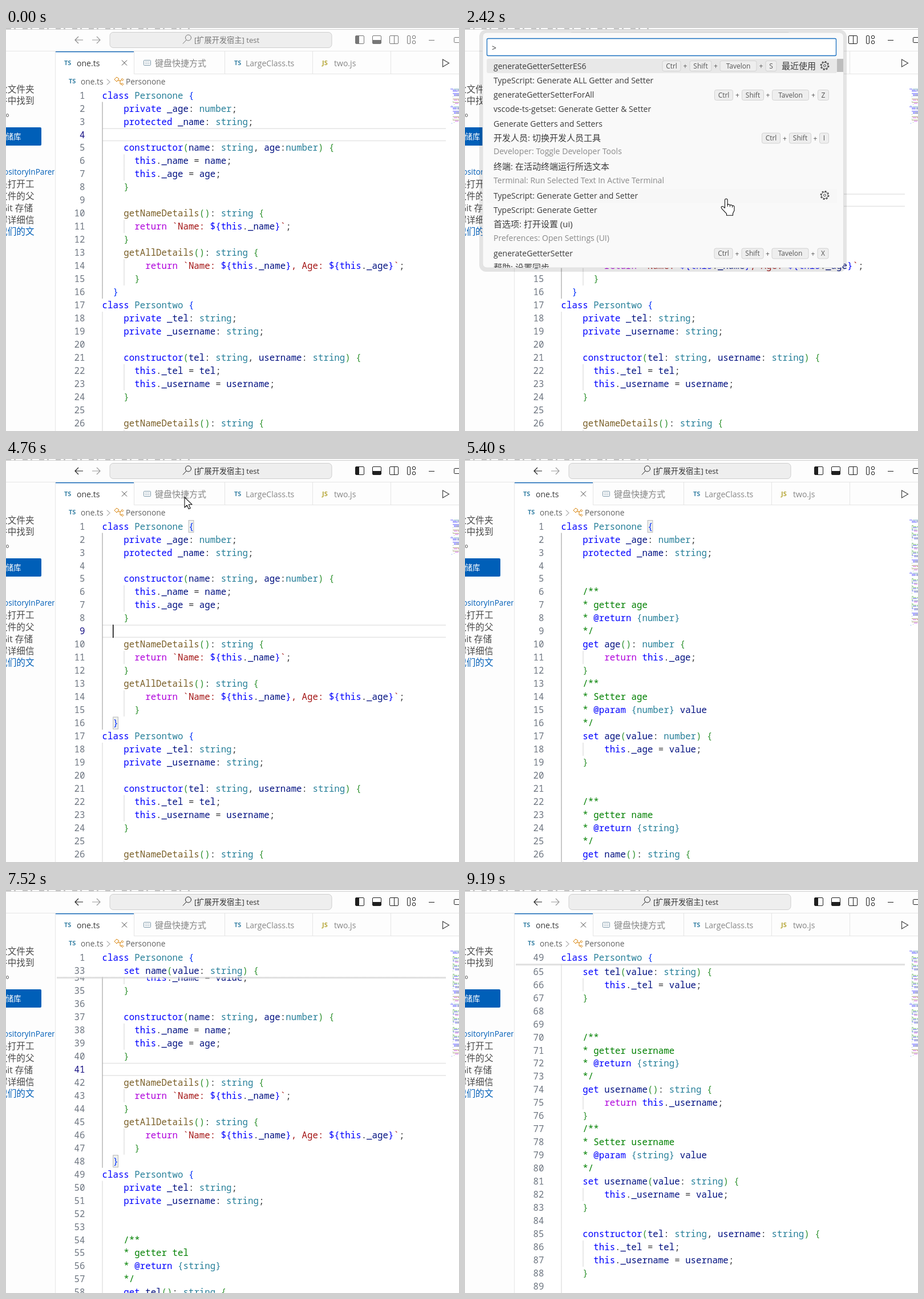
Animation of 794x706 px, one loop 9.81 s. Source, as an HTML page:

```html
<!DOCTYPE html>
<html lang="zh">
<head>
<meta charset="utf-8">
<title>Generate getters and setters</title>
<style>
html, body { margin: 0; width: 100%; height: 100%; overflow: hidden; background: #fff; }
svg { display: block; width: 794px; height: 706px; }
text { font-family: "Open Sans", "Noto Sans CJK SC", "Noto Sans CJK", sans-serif; white-space: pre; }
.code { font: 15.77px "Noto Sans Mono", "DejaVu Sans Mono", monospace; font-variant-ligatures: none; }
</style>
</head>
<body>
<svg id="stage" viewBox="0 0 794 706">
  <defs>
    <clipPath id="editorClip"><rect x="87" y="106" width="685" height="600"/></clipPath>
    <clipPath id="mapClip"><rect x="776" y="104" width="18" height="300"/></clipPath>
    <clipPath id="sideClip"><rect width="85" height="706"/></clipPath>
    <clipPath id="listClip"><rect x="31" y="50" width="632" height="370"/></clipPath>
    <linearGradient id="shade" x2="0" y2="1">
      <stop offset="0" stop-color="#cfcfcf"/><stop offset="1" stop-color="#cfcfcf" stop-opacity="0"/>
    </linearGradient>
  </defs>
  <g id="scene"></g>
</svg>
<script>
const LOOP = 9810, LINE = 22.97, CHAR = 9.46, LEFT = 168.5, TOP = 118, NOTCH = 144.5;
const WHEEL = [6020, 6420, 7160, 7400, 7480, 7760, 7880, 8250, 8700, 9070];
const OPEN = 1850, PASTE = 2870, RUN = 4760, INSERT = 4960;
const SUPER_KEY = 'Tavelon';
const scene = document.getElementById('scene');

const esc = s => s.replace(/&/g, '&amp;').replace(/</g, '&lt;');
const rect = (x, y, w, h, fill, more = '') =>
  `<rect x="${x}" y="${y}" width="${w}" height="${h}" fill="${fill}" ${more}/>`;
const path = (d, stroke, more = 'fill="none"') => `<path d="${d}" stroke="${stroke}" ${more}/>`;
const label = (x, y, s, fill = '#3b3b3b', size = 14.05, more = '') =>
  `<text x="${x}" y="${y + size * 0.36}" font-size="${size}" fill="${fill}" ${more}>${esc(s)}</text>`;

// ---- source code shown in the editor ----
const accessors = ([name, type]) => ['', '',
  '/**', `* getter ${name}`, `* @return {${type}}`, '*/',
  `get ${name}(): ${type} {`, `    return this._${name};`, '}',
  '/**', `* Setter ${name}`, `* @param {${type}} value`, '*/',
  `set ${name}(value: ${type}) {`, `    this._${name} = value;`, '}'
].map(s => s && '    ' + s);

function classLines(name, fields, params, first, second, props) {
  const [a, b] = second;
  return [
    `class ${name} {`, ...fields.map(f => '    ' + f), ...props.flatMap(accessors), '',
    `    constructor(${params}) {`,
    ...first.map(p => `      this._${p} = ${p};`), '    }', '',
    '    getNameDetails(): string {', '      return `Name: ${this._' + a + '}`;', '    }',
    '    getAllDetails(): string {',
    '        return `Name: ${this._' + a + '}, Age: ${this._' + b + '}`;', '      }', '  }'
  ];
}

function makeDoc(full) {
  const lines = [
    ...classLines('Personone', ['private _age: number;', 'protected _name: string;'],
      'name: string, age:number', ['name', 'age'], ['name', 'age'],
      full ? [['age', 'number'], ['name', 'string']] : []),
    ...classLines('Persontwo', ['private _tel: string;', 'private _username: string;'],
      'tel: string, username: string', ['tel', 'username'], ['username', 'tel'],
      full ? [['tel', 'string'], ['username', 'string']] : [])
  ];
  const tokens = lines.map(tokenize);
  const scopes = [];
  lines.forEach((s, i) => {
    if (/^    \w.*\{$/.test(s)) scopes.push([i, lines.findIndex((q, j) => j > i && /^ +\}$/.test(q))]);
  });
  return { lines, tokens, scopes, classEnd: lines.indexOf('  }'), map: minimap(tokens) };
}

const RULES = [
  ['#0000ff', /^(class|private|protected|constructor|this|get|set)\b/],
  ['#af00db', /^return\b/],
  ['#267f99', /^(number|string|Personone|Persontwo)\b/],
  ['#795e26', /^get\w+Details/],
  ['#a31515', /^(`Name: |, Age: |`)/],
  ['#0000ff', /^(\$\{|\}(?=[`,]))/],
  ['bracket', /^[(){}]/],
  ['#001080', /^\w+/],
  ['#3b3b3b', /^( +|.)/]
];
const DOC_RULES = [
  ['#0000ff', /^@\w+/],
  ['#267f99', /^\{\w+\}/],
  ['#001080', /^value/],
  ['#008000', /^( +|[^ ]+)/]
];

function tokenize(line) {
  const rules = /^ *[/*]/.test(line) ? DOC_RULES : RULES;
  const bracket = /^class|^  \}$/.test(line) ? '#0431fa' : '#319331';
  const out = [];
  for (let col = 0; col < line.length;) {
    const rest = line.slice(col);
    const [color, re] = rules.find(r => r[1].test(rest));
    const text = rest.match(re)[0];
    out.push({ col, text, color: color === 'bracket' ? bracket : color });
    col += text.length;
  }
  return out;
}

function minimap(tokens) {
  const marks = tokens.map((row, i) => row.filter(k => k.text.trim() && k.col < 15)
    .map(k => rect(779 + k.col, 106.4 + i * 1.94, k.text.length, 1.1, k.color)).join(''));
  return `<g clip-path="url(#mapClip)" opacity=".55">${marks.join('')}</g>`;
}

const before = makeDoc(false), after = makeDoc(true);

function codeText(doc, i, y, active) {
  const spans = doc.tokens[i].map(k => `<tspan fill="${k.color}">${esc(k.text)}</tspan>`).join('');
  return `<text class="code" x="138.5" y="${y + 5.6}" text-anchor="end" fill="${active ? '#171184' : '#6e7681'}">${i + 1}</text>` +
    `<text class="code" x="${LEFT}" y="${y + 5.6}" xml:space="preserve">${spans}</text>`;
}

function editor(doc, scroll, cursorLine, boxes, caret) {
  const yOf = i => TOP + i * LINE - scroll;
  const half = LINE / 2;
  let s = '';
  const cy = yOf(cursorLine);
  s += rect(169, cy - 11.5, 602, 1.6, '#e6e6e6') + rect(169, cy + 9.8, 602, 1.6, '#e6e6e6');
  doc.lines.forEach((line, i) => {
    const y = yOf(i);
    if (y < 90 || y > 725) return;
    if (!line.startsWith('class'))
      s += rect(168.5, y - half, 1, LINE + 0.1, i <= doc.classEnd ? '#939393' : '#d3d3d3');
    if (/^ {5}/.test(line)) s += rect(206.5, y - half, 1, LINE + 0.1, '#d3d3d3');
    if (boxes && (i === 0 || i === doc.classEnd)) {
      const col = i ? 2 : 16;
      s += rect(LEFT + col * CHAR + 0.3, y - 10.5, CHAR - 0.7, 21, '#eef0ee', 'stroke="#b9b9b9"');
    }
    s += codeText(doc, i, y, i === cursorLine);
  });
  if (caret) s += rect(187, cy - 11.5, 1.5, 23, '#000');

  // Sticky headers of the scopes that have scrolled past the top
  if (scroll > 0) {
    const second = doc.classEnd + 1;
    const owner = yOf(second) < TOP ? second : 0;
    const method = owner === 0 && doc.scopes.find(([a, b]) => yOf(a) < 140 && yOf(b) > 141);
    const rows = method ? [owner, method[0]] : [owner];
    const h = rows.length * LINE;
    s += rect(88, 106, 684, h + 0.5, '#fff') + rect(89, 106.5 + h, 682, 4, 'url(#shade)');
    rows.forEach((i, n) => { s += codeText(doc, i, TOP + n * LINE); });
  }
  return `<g clip-path="url(#editorClip)">${s}</g>` + doc.map;
}

// ---- window frame ----
function sidebar() {
  const ink = '#4a4a4a', blue = '#005fb8';
  const row = (y, s, fill = ink, end = 49.5) => label(end, y, s, fill, 15.6, 'text-anchor="end"');
  return rect(0, 41, 86, 665, '#fdfdfd') + rect(86, 41, 1, 665, '#e5e5e5') +
    '<g clip-path="url(#sideClip)">' +
    row(107, '父文件夹') + row(127.5, '件中找到') + row(148, '库。', ink, 15) +
    rect(-10, 174, 72, 32, blue, 'rx="2"') + label(26.5, 190, '存储库', '#fff', 13.5, 'text-anchor="end"') +
    label(-4, 252, 'ositoryInParentFolders', blue, 13.6) +
    row(273, '是打开工') + row(294, '文件的父') + row(315, 'Git 存储', ink, 47) +
    row(336, '解详细信') + row(356, '我们的文', blue) + '</g>';
}

function titleBar(focused, canGoBack) {
  const ink = focused ? '#1f1f1f' : '#777';
  const arrow = 'fill="none" stroke-width="1.2"';
  const frame = (x, w = 15) => rect(x + 0.5, 13.5, w, 14, 'none', `stroke="${ink}" rx="1.5"`);
  return rect(0, 0, 794, 41, '#fdfdfd') + rect(0, 2, 794, 1, '#cfcfcf') + rect(0, 40, 794, 1, '#e5e5e5') +
    path('M0 1H322', '#8f8f8f', 'stroke-dasharray="9 5 3 12"') +
    path('M135 21H121.5M127 15l-6 6 6 6', canGoBack ? '#222' : '#8a8a8a', arrow) +
    path('M151 21h13.5M159 15l6 6-6 6', '#9a9a9a', arrow) +
    rect(182, 7.5, 389, 27, '#eeeeee', 'rx="6" stroke="#cfcfcf"') +
    `<circle cx="319.5" cy="17" r="5" fill="none" stroke="${ink}"/>` + path('M316 21l-6 6.5', ink) +
    label(330, 21, '[扩展开发宿主] test', focused ? '#333' : '#777', 13.2) +
    frame(612) + rect(613, 14, 6, 13, ink) +
    frame(642) + rect(643, 21, 14, 6, ink) +
    frame(672) + path('M680.5 14v13', ink) +
    rect(703.5, 13.5, 5, 14, 'none', `stroke="${ink}" rx="1.5"`) +
    rect(712.5, 13.5, 5, 5, 'none', `stroke="${ink}" rx="1.5"`) +
    rect(712.5, 22.5, 5, 5, 'none', `stroke="${ink}" rx="1.5"`) +
    path('M741 21.5h10', ink) + rect(785.5, 16.5, 10, 9, 'none', `stroke="${ink}" rx="1"`);
}

function tabs() {
  const gray = '#868686', ts = '#3f86a8';
  const badge = (x, y, s, fill) => label(x, y, s, fill, 11, 'font-weight="700"');
  let s = rect(87, 41, 707, 40, '#fdfdfd') + rect(224, 80, 570, 1, '#e5e5e5') +
    rect(87, 41, 137, 40, '#fff') + rect(87, 41, 137, 1.3, '#005fb8');
  for (const x of [224, 383, 537, 674]) s += rect(x, 41, 1, 40, '#e5e5e5');
  return s +
    badge(102, 61, 'TS', ts) + label(124, 62, 'one.ts') +
    path('M203 56.5l9 9m0-9l-9 9', '#444') +
    rect(241.5, 56.5, 12, 9, 'none', 'stroke="#7c97a8" rx="1"') +
    path('M244 59.5h8M244 62.5h8', '#7c97a8', 'stroke-dasharray="1.5 1"') +
    label(261, 61.5, '键盘快捷方式', gray, 15) +
    badge(400, 61, 'TS', ts) + label(420, 62, 'LargeClass.ts', gray) +
    badge(554, 61, 'JS', '#b7a83b') + label(575, 62, 'two.js', gray) +
    path('M765.5 55l11 6.5-11 6.5z', '#444', 'fill="none" stroke-width="1.2"') +
    badge(110, 93.5, 'TS', ts) + label(131, 94.5, 'one.ts', '#616161', 13.75) +
    path('M177 89.5l5 5-5 5', '#777') +
    path('M190 90l4-4 4 3-4 5zM196 92h4v6h2M200 92h2M202 90l2-1.5 2 2-2 2zM202 98l2-1.5 2 2-2 2z', '#d67e00') +
    label(210, 94.5, 'Personone', '#616161', 13.75);
}

// ---- command palette ----
function keys(x, last, superKey = true) {
  const key = (dx, w, s) => rect(x + dx, 57.5, w, 18, '#eeeeee', 'rx="3" stroke="#d2d2d2"') +
    label(x + dx + w / 2, 66.5, s, '#555', 12, 'text-anchor="middle"');
  const plus = dx => label(x + dx, 67, '+', '#555', 12, 'text-anchor="middle"');
  return key(0, 32, 'Ctrl') + plus(40) + key(48, 38, 'Shift') + plus(93.5) +
    (superKey ? key(101, 64, SUPER_KEY) + plus(173) + key(181, 19, last) : key(101, 16, last));
}

const gear = y => `<g fill="none" stroke="#444"><circle cx="630.5" cy="${y}" r="7" stroke-width="1.8" stroke-dasharray="2.9 2.6"/>` +
  `<circle cx="630.5" cy="${y}" r="5.6"/><circle cx="630.5" cy="${y}" r="2"/></g>`;
const atRow = (y, s) => `<g transform="translate(0 ${y - 66})">${s}</g>`;
const item = (y, s, fill, more) => label(50, y, s, fill, /[\u4e00-\u9fff]/.test(s) ? 15 : 14.05, more);

function fullList() {
  const soft = '#8a8a8a';
  return '<g clip-path="url(#listClip)">' + rect(38, 54, 614, 25, '#e8e8e8', 'rx="3"') +
    rect(38, 282, 614, 25, '#f7f7f7') + rect(652, 54, 12, 23, '#bdbdbd') +
    item(66.5, 'generateGetterSetterES6') + keys(346, 'S') + label(555, 66.5, '最近使用', '#3b3b3b', 15) + gear(66) +
    item(91.5, 'TypeScript: Generate ALL Getter and Setter') +
    item(117, 'generateGetterSetterForAll') + atRow(117, keys(437.5, 'Z')) +
    item(142, 'vscode-ts-getset: Generate Getter & Setter') +
    item(168, 'Generate Getters and Setters') +
    item(193, '开发人员: 切换开发人员工具') + atRow(192.5, keys(520.5, 'I', false)) +
    item(216, 'Developer: Toggle Developer Tools', soft) +
    item(243, '终端: 在活动终端运行所选文本') +
    item(267, 'Terminal: Run Selected Text In Active Terminal', soft) +
    item(294, 'TypeScript: Generate Getter and Setter') + gear(293) +
    item(319, 'TypeScript: Generate Getter') +
    item(344, '首选项: 打开设置 (ui)') + item(368, 'Preferences: Open Settings (UI)', soft) +
    item(395, 'generateGetterSetter') + atRow(394.5, keys(437, 'X')) +
    item(420, '帮助: 设置同步') + '</g>';
}

function shortList(hoverRow) {
  const shift = hoverRow === 1 ? 0 : 23;
  return rect(38, 54, 619, 25, '#e8e8e8', 'rx="3"') +
    (hoverRow > 0 ? rect(38, 54 + hoverRow * 25.5, 619, 25, '#f2f2f2', 'rx="3"') + gear(66.5 + hoverRow * 25.5) : '') +
    item(66.5, 'generateGetterSetterForAllES6', '#0060b8', 'font-weight="700"') + keys(408.5, 'D') + gear(66) +
    item(92, 'generateGetterSetterForAll') + atRow(92.5, keys(346 + shift, 'Z')) +
    label(555 + shift, 92.5, '类似命令', '#8a8a8a', 15) +
    item(117.5, 'TypeScript: Generate ALL Getter and Setter');
}

function palette(t, pointer) {
  const pasted = t >= PASTE, bottom = pasted ? 135 : 420;
  const hoverRow = pointer ? (pointer[1] >= 105 ? 2 : pointer[1] >= 80 ? 1 : 0) : 0;
  const caretOn = (t >= OPEN && t < 2420) || (t >= PASTE && t < 3410) || (t >= 3940 && t < 4430);
  return rect(25, 3, 644, bottom + 4, '#000', 'rx="12" opacity=".1"') +
    rect(31, 8, 632.5, bottom - 8, '#f9f9f9', 'rx="7" stroke="#e0e0e0"') +
    rect(38.5, 18.5, 612, 30, '#fff', 'rx="2" stroke="#1a70c0" stroke-width="1.3"') +
    label(47, 35, '>') + (pasted ? label(56.5, 35, 'generateGetterSetterForAllES6') : '') +
    (caretOn ? rect(pasted ? 255.5 : 55, 24, 1, 20, '#000') : '') +
    (pasted ? shortList(hoverRow) : fullList());
}

// ---- mouse pointer ----
const mix = (a, b, k) => a + (b - a) * k;

function pointerAt(t) {
  if (t >= OPEN && t < PASTE) return [458, 299];
  if (t < 3740 || t >= 5400) return null;
  const stops = [[3740, 342, 123], [3820, 322, 92], [4140, 313, 67], [5320, 313, 67], [5400, 410, 98]];
  const tick = t - (t - 3740) % 40;
  const n = stops.findIndex(p => tick < p[0]);
  const [a, b] = [stops[n - 1], stops[n]];
  const k = (tick - a[0]) / (b[0] - a[0]);
  return [mix(a[1], b[1], k), mix(a[2], b[2], k)];
}

function pointerShape([x, y], hand) {
  const d = hand
    ? 'M-2.5 2.5a2.3 2.3 0 0 1 4.6 0v8q2.500-1.500 4.300.8 2.300-1.300 4.100 1 3.200-.8 3.500 2.500v6l-2.500 5v3.500h-11v-3l-8.500-9q-2-3 .5-3.700 2-.5 5 2.700z'
    : 'M0 0v18l4.200-4 3 6.500 3-1.300-3-6.400h6z';
  return `<g transform="translate(${x} ${y})">` +
    path(d, '#111', 'fill="#fff" stroke-width="1.1" stroke-linejoin="round"') +
    (hand ? path('M2.1 10v4M6.4 11.500v3M10.500 12.500v3', '#111') : '') + '</g>';
}

function draw(t) {
  const focused = t >= 540, paletteOpen = t >= OPEN && t < RUN, inserted = t >= INSERT;
  const scroll = WHEEL.filter(w => t >= w).length * NOTCH;
  const caret = !inserted && !paletteOpen && focused && !(t >= 1070 && t < 1520);
  const line = inserted ? 40 : focused ? 8 : 3;
  const pointer = pointerAt(t);
  return rect(0, 0, 794, 706, '#fff') +
    editor(inserted ? after : before, scroll, line, focused && !paletteOpen, caret) +
    sidebar() + titleBar(focused, t >= RUN) + tabs() +
    (paletteOpen ? palette(t, pointer) : '') +
    (pointer ? pointerShape(pointer, paletteOpen) : '');
}

let shown = '';
const start = performance.now();
function frame() {
  const svg = draw((performance.now() - start) % LOOP);
  if (svg !== shown) scene.innerHTML = shown = svg;
  requestAnimationFrame(frame);
}
frame();
</script>
</body>
</html>
```
